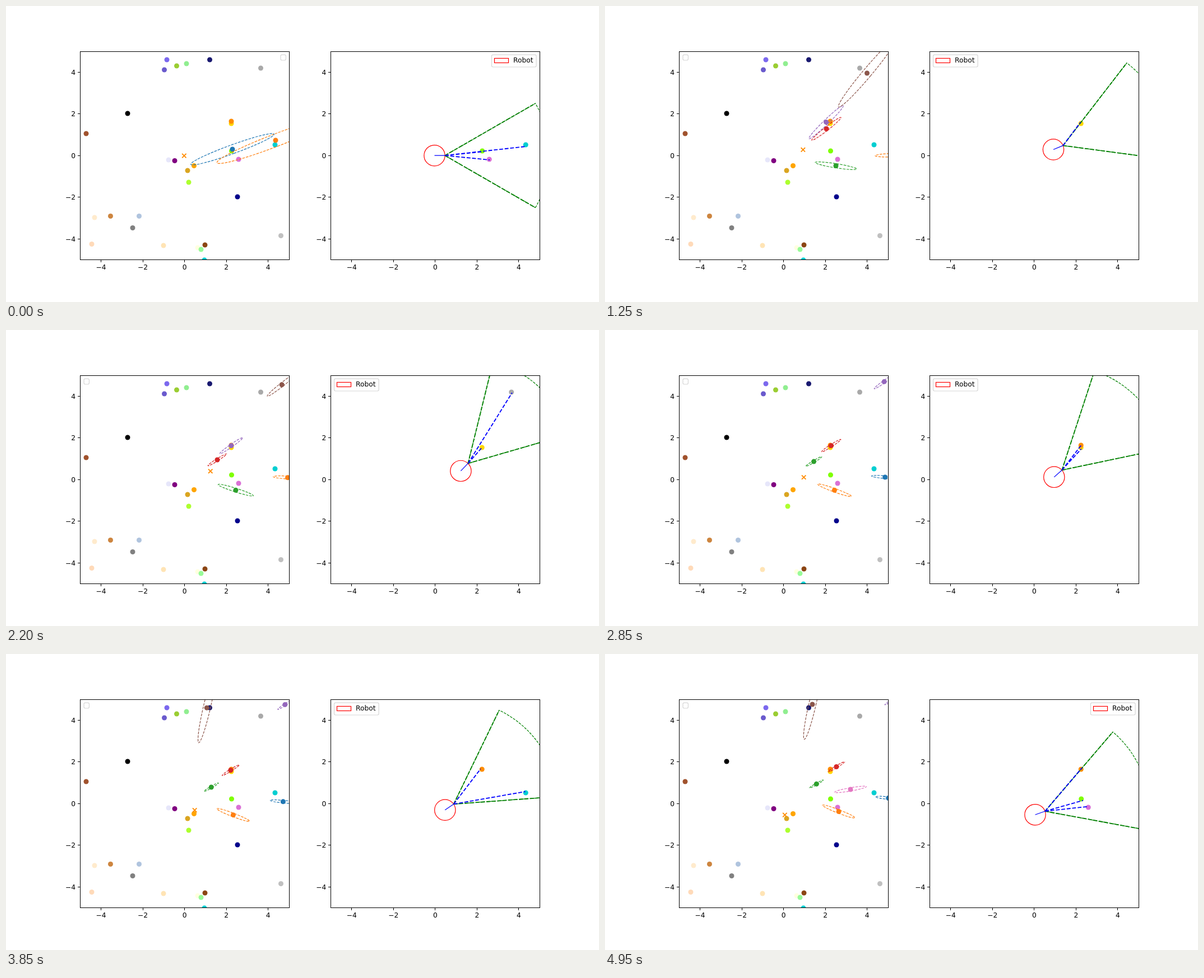
These frames come from a looping animation (1058 px wide and 529 px high, 5 s). An HTML page:

```html
<!DOCTYPE html>
<html lang="en">
<head>
<meta charset="utf-8">
<title>Robot landmark mapping</title>
<style>
html, body { margin: 0; width: 100%; height: 100%; overflow: hidden; background: #fff; }
svg { display: block; width: 100%; height: 100%; }
text { font: 12.25px "DejaVu Sans", sans-serif; fill: #000; }
</style>
</head>
<body>
<svg id="stage" viewBox="0 0 1058 529"></svg>
<script>
const LOOP = 5000, STEP = 50;
const LEFT = 132.25, TOP = 80.8, SIZE = 372.7, UNIT = SIZE / 10;
const SHIFT = 447.25;              // distance between the two panels
const RADIUS = UNIT / 2, RANGE = UNIT * 5, FOV = 30, DETECTION = 0.7;
const THIN = 1.22, THICK = 1.84;
const TAB = ['#1f77b4', '#ff7f0e', '#2ca02c', '#d62728', '#9467bd', '#8c564b', '#e377c2', '#7f7f7f'];

const svg = document.getElementById('stage');

function add(parent, tag, attrs = {}, text) {
  const el = document.createElementNS('http://www.w3.org/2000/svg', tag);
  set(el, attrs);
  if (text) el.textContent = text;
  parent.appendChild(el);
  return el;
}

function set(el, attrs) {
  for (const k in attrs) el.setAttribute(k, attrs[k]);
}

function show(el, on) {
  el.setAttribute('visibility', on ? 'visible' : 'hidden');
}

function dashed(color, width) {
  return { fill: 'none', stroke: color, 'stroke-width': width,
    'stroke-dasharray': `${3.7 * width} ${1.6 * width}` };
}

const dot = (parent, x, y, fill) => add(parent, 'circle', { cx: x, cy: y, r: 4.5, fill });
const snap = v => Math.floor(v) + 0.5;

// Rows of [time, ...values], blended linearly and held at both ends.
function sample(rows, t) {
  const i = rows.findIndex(r => r[0] > t);
  if (i === 0) return rows[0].slice(1);
  if (i < 0) return rows[rows.length - 1].slice(1);
  const a = rows[i - 1], b = rows[i], k = (t - a[0]) / (b[0] - a[0]);
  return a.slice(1).map((v, j) => v + (b[j + 1] - v) * k);
}

function noise(seed) {
  const v = Math.sin(seed * 12.9898 + 4.1) * 43758.5453;
  return v - Math.floor(v);
}

function polar(x, y, r, deg) {
  const a = deg * Math.PI / 180;
  return [x + r * Math.cos(a), y - r * Math.sin(a)];
}

const landmarks = [
  [287, 96, 'mediumslateblue'], [282.5, 114, 'slateblue'], [304.5, 107, 'yellowgreen'],
  [322, 103, 'lightgreen'], [363.5, 96, 'midnightblue'], [454.5, 111, 'darkgray'],
  [217, 192, 'black'], [143, 228, 'sienna'], [402, 210, 'gold'], [402, 206, 'darkorange'],
  [480, 248, 'darkturquoise'], [402.5, 259, 'chartreuse'], [415, 274, 'orchid'],
  [290, 275, 'lavender'], [301, 276.5, 'purple'], [335.5, 285.5, 'orange'],
  [324, 294, 'goldenrod'], [326, 315, 'greenyellow'], [413, 341, 'darkblue'],
  [158, 378, 'blanchedalmond'], [186.5, 375.5, 'peru'], [237.5, 375.5, 'lightsteelblue'],
  [226, 396.5, 'gray'], [153, 425.5, 'peachpuff'], [281, 428, 'moccasin'],
  [342, 432, 'lightyellow'], [348, 435, 'palegreen'], [355, 427, 'saddlebrown'],
  [490.5, 410.5, 'silver'], [354, 454, 'darkturquoise']
];

// Robot: time, x, y, heading. It drives forward, then backs away.
const path = [
  [0, 764.5, 267.2, 0], [750, 789.1, 261.5, 20.1], [1250, 800, 256.5, 22.4],
  [2000, 814.5, 248.5, 47.5], [3450, 792, 273, 37.9],
  [4300, 773.5, 285.2, 30], [4950, 767.5, 287.2, 19.5]
];

function panel(x, id) {
  const frame = { x: snap(x), y: 81.5, width: 373, height: 372 };
  add(add(add(svg, 'defs'), 'clipPath', { id }), 'rect', frame);
  const body = add(svg, 'g', { 'clip-path': `url(#${id})` });
  add(svg, 'rect', { ...frame, fill: 'none', stroke: '#000' });
  for (let v = -4; v <= 4; v += 2) {
    const label = String(v).replace('-', '\u2212');
    const px = x + SIZE / 2 + v * UNIT, py = TOP + SIZE / 2 - v * UNIT;
    add(svg, 'path', { d: `M${snap(px)} 453.5v4.5M${snap(x)} ${snap(py)}h-4.5`, stroke: '#000' });
    add(svg, 'text', { x: px, y: 471, 'text-anchor': 'middle' }, label);
    add(svg, 'text', { x: x - 8.2, y: py + 4.6, 'text-anchor': 'end' }, label);
  }
  return body;
}

function legendBox(x, width, height) {
  const g = add(svg, 'g');
  add(g, 'rect', { x, y: 87.2, width, height, rx: 2.4, fill: '#fff', 'fill-opacity': 0.8,
    stroke: '#ccc', 'stroke-opacity': 0.8, 'stroke-width': THIN });
  return g;
}

const mapView = panel(LEFT, 'clipMap');
const robotView = panel(LEFT + SHIFT, 'clipRobot');

landmarks.forEach(([x, y, c]) => dot(mapView, x, y, c));
const cross = add(mapView, 'path', { d: 'M-3.7-3.7L3.7 3.7M-3.7 3.7L3.7-3.7',
  stroke: '#ff8c00', 'stroke-width': THICK });

// Estimates move through shared phases; the last one is approached ever more slowly.
const PHASES = [0, 750, 1250, 2250];
const settle = t => t < 1250 ? t : 1250 + 1000 * (1 - Math.exp((1250 - t) / 800));
const sway = [[3450, 0, 0], [4300, -8, 2.5], [4950, 8, -5]];

// Poses: x, y, half length, angle; they end at the last phase unless told otherwise.
const tracks = [];
function track(from, poses, last = 3, to = LOOP) {
  const first = last + 1 - poses.length;
  tracks.push({ from, to,
    rows: poses.map((p, i) => [PHASES[first + i], ...p]),
    ring: add(mapView, 'path', dashed('#000', THIN)),
    mark: dot(mapView, 0, 0, '#000') });
}
track(0, [[404, 256, 79, 20], [408, 261.5, 34, -60]], 1, 1000);
track(0, [[481, 240, 112, 21], [481, 245.5, 33, -57], [514, 266.5, 32, 2], [497.5, 262.5, 23, -6]]);
track(300, [[411, 273.5, 37, -68], [412, 285.5, 37.5, -9], [409, 286.5, 31, -21.5]]);
track(400, [[390, 211, 65, -22.5], [395, 219.5, 33, 38], [369, 237.5, 14, 30]]);
track(550, [[401, 205, 112, -22], [394.5, 207.5, 42.5, 44], [405, 206.5, 17, 31]]);
track(1100, [[467.5, 120, 79, 50], [503, 88, 13, 33]]);
track(2900, [[362, 95, 64, 77]]);
track(3950, [[430, 247, 29, 10]]);

const seen = landmarks.map(([x, y, c]) => dot(robotView, x + SHIFT, y, c));
const body = add(robotView, 'circle', { r: RADIUS, fill: 'none', stroke: '#f00', 'stroke-width': THIN });
const heading = add(robotView, 'path', { stroke: '#00f', 'stroke-width': THIN });
const wedge = add(robotView, 'path', dashed('#008000', THIN));
const edges = add(robotView, 'path', dashed('#008000', THICK));
const rays = add(robotView, 'path', dashed('#00f', THICK));

const emptyLegend = legendBox(490, 9.4, 9.8);
const robotLegend = legendBox(866.5, 79.6, 21.8);
add(robotLegend, 'rect', { x: 871.5, y: 93.5, width: 25, height: 8, fill: 'none', stroke: '#f00', 'stroke-width': THIN });
add(robotLegend, 'text', { x: 905, y: 101.4 }, 'Robot');

function drawMap(t) {
  const drop = t >= 2800 ? 1 : 0;   // the first estimate is discarded, colours move up
  const [dx, dy] = sample(sway, t);
  tracks.forEach(({ from, to, rows, ring, mark }, i) => {
    const on = t >= from && t < to;
    show(ring, on);
    show(mark, on);
    if (!on) return;
    const [px, py, a, deg] = sample(rows, settle(t));
    const x = px + dx, y = py + dy, b = a * 0.1;
    const color = TAB[Math.max(0, i - drop)];
    set(ring, { d: `M0 ${b}A${a} ${b} 0 0 0 0 ${-b}A${a} ${b} 0 0 0 0 ${b}`,
      stroke: color, transform: `translate(${x} ${y}) rotate(${-deg})` });
    set(mark, { cx: x, cy: y, fill: color });
  });
}

function drawRobot(t, n) {
  const [x, y, dir] = sample(path, t);
  const nose = polar(x, y, RADIUS, dir);
  const up = polar(...nose, RANGE, dir + FOV), down = polar(...nose, RANGE, dir - FOV);
  set(cross, { transform: `translate(${x - SHIFT + 0.6} ${y + 0.4})` });
  set(body, { cx: x, cy: y });
  set(heading, { d: `M${x} ${y}L${nose}` });
  set(edges, { d: `M${nose}L${up}M${nose}L${down}` });
  set(wedge, { d: `M${down}A${RANGE} ${RANGE} 0 0 0 ${up}L${nose}Z` });

  let d = '';
  landmarks.forEach(([lx, ly], i) => {
    const dx = lx + SHIFT - nose[0], dy = nose[1] - ly;
    const off = Math.atan2(dy, dx) * 180 / Math.PI - dir;
    const seed = n * 31 + i;
    const on = Math.abs(off) < FOV && Math.hypot(dx, dy) < RANGE && noise(seed) < DETECTION;
    show(seen[i], on);
    if (!on) return;
    const jitter = k => (noise(seed + k) + noise(seed + k + 0.5) - 1) * 4;
    d += `M${nose}L${lx + SHIFT + jitter(0.2)} ${ly + jitter(0.3)}`;
  });
  set(rays, { d: d || 'M0 0' });
}

function draw(time) {
  const n = Math.floor((time % LOOP) / STEP), t = n * STEP;
  drawMap(t);
  drawRobot(t, n);
  // Legends keep clear of the drawing.
  set(emptyLegend, { transform: `translate(${t < 1100 ? 0 : -351} 0)` });
  set(robotLegend, { transform: `translate(${t < 800 || t >= 4200 ? 0 : -281} 0)` });
}

const start = performance.now();
function tick() {
  draw(performance.now() - start);
  requestAnimationFrame(tick);
}
tick();
</script>
</body>
</html>
```
